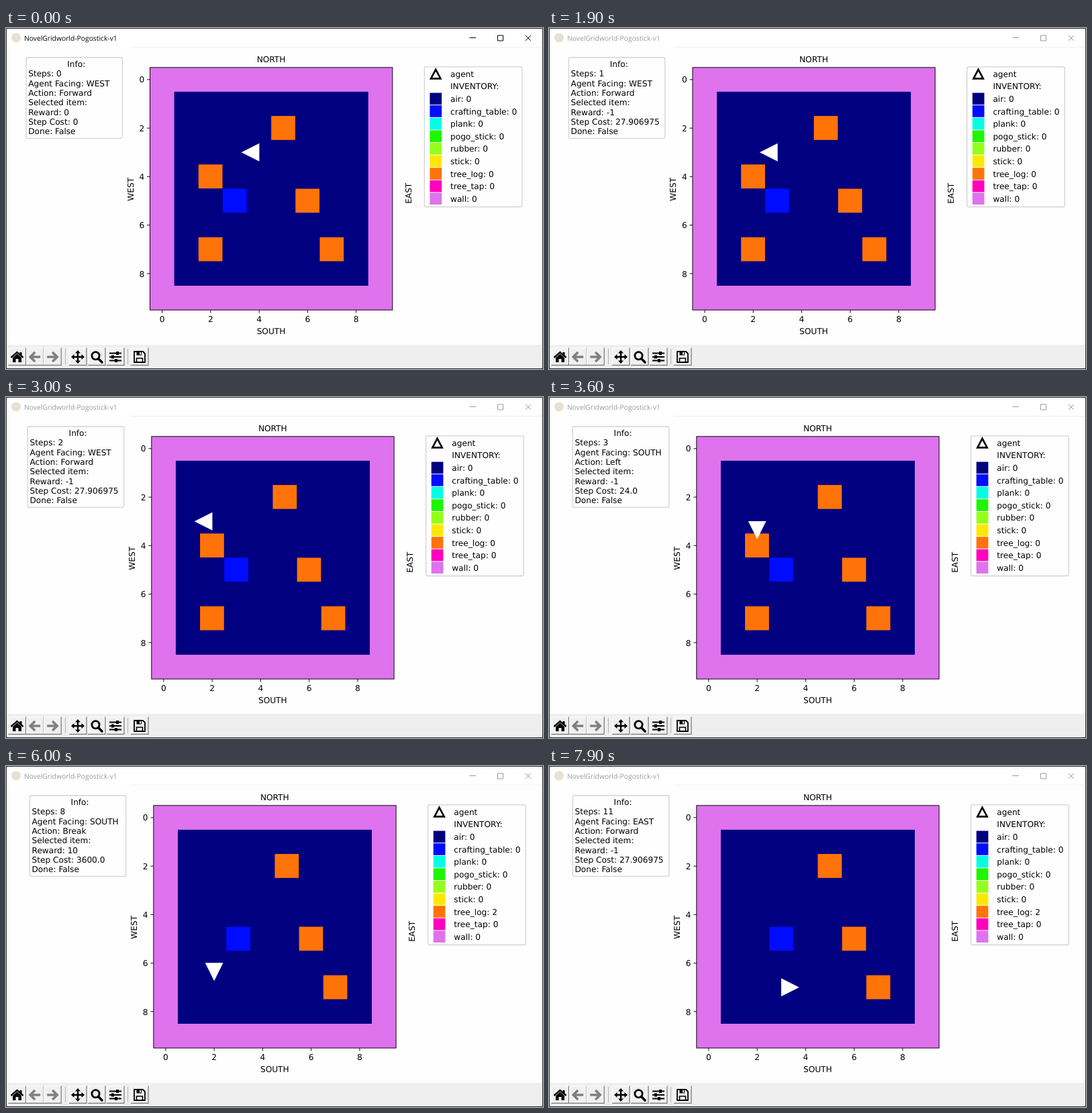
Recreate the animation shown at these times as an HTML page. Size 800 by 508 pixels, loop 8000 ms.

```html
<!DOCTYPE html>
<html lang="en">
<head>
<meta charset="utf-8">
<title>Gridworld</title>
<style>
html, body { margin: 0; width: 100%; height: 100%; overflow: hidden; background: #fff; }
svg { display: block; width: 100vw; height: 100vh; }
text { font: 12.15px "DejaVu Sans", sans-serif; text-rendering: geometricPrecision; white-space: pre; }
#title { font: 10.3px "Open Sans", sans-serif; }
</style>
</head>
<body>
<svg id="stage" viewBox="0 0 800 508"></svg>
<script>
const LOOP = 8000, CELL = 36.13, LEFT = 214.5, TOP = 58.8;
const COLORS = {
  air: '#000080', crafting_table: '#000cff', plank: '#00ffe4', pogo_stick: '#20f500',
  rubber: '#94ff1a', stick: '#ffe800', tree_log: '#ff7308', tree_tap: '#ff00be', wall: '#de73ed'
};
const FACING = {
  WEST: { dx: -1, dy: 0, turn: -90, left: 'SOUTH' },
  SOUTH: { dx: 0, dy: 1, turn: 180, left: 'EAST' },
  EAST: { dx: 1, dy: 0, turn: 90, left: 'NORTH' }
};
const COST = { Forward: '27.906975', Left: '24.0', Break: '3600.0' };
const ACTIONS = [
  [1900, 'Forward'], [2800, 'Forward'], [3300, 'Left'], [3700, 'Break'],
  [4200, 'Forward'], [4800, 'Forward'], [5400, 'Forward'], [5900, 'Break'],
  [6800, 'Forward'], [7400, 'Left'], [7800, 'Forward']
];
const SHIFT = [0, -0.6, 2.3, 5.3];
const LOGS = [[5, 2], [2, 4], [6, 5], [2, 7], [7, 7]];

const px = c => LEFT + (c + 0.5) * CELL;
const py = r => TOP + (r + 0.5) * CELL;
const rect = (x, y, w, h, fill, more = '') =>
  `<rect x="${x}" y="${y}" width="${w}" height="${h}" fill="${fill}" ${more}/>`;
const path = (d, stroke, width = 1, fill = 'none', more = '') =>
  `<path d="${d}" stroke="${stroke}" stroke-width="${width}" fill="${fill}" ${more}/>`;
const text = (x, y, s, anchor = 'start', more = '') =>
  `<text x="${x}" y="${y}" text-anchor="${anchor}" ${more}>${s}</text>`;
const upright = (x, y, s) => text(0, 0, s, 'middle', `transform="translate(${x} ${y}) rotate(-90)"`);
const block = (c, r, fill) => rect(px(c) - CELL / 2, py(r) - CELL / 2, CELL - 0.4, CELL - 0.4, fill);
const frame = (x, y, w, h) => rect(x, y, w, h, '#fefefe', 'rx="2.5" stroke="#d3d3d3" stroke-width="1.3"');

function stateAt(t) {
  const s = { steps: 0, x: 4, y: 3, face: 'WEST', action: 'Forward', reward: 0, cost: '0', logs: LOGS, count: 0 };
  for (const [start, action] of ACTIONS) {
    if (t < start) break;
    const f = FACING[s.face];
    s.steps++;
    s.action = action;
    s.cost = COST[action];
    s.reward = -1;
    if (action === 'Forward') {
      s.x += f.dx;
      s.y += f.dy;
    } else if (action === 'Left') {
      s.face = f.left;
    } else {
      s.logs = s.logs.filter(([x, y]) => x !== s.x + f.dx || y !== s.y + f.dy);
      s.count++;
      s.reward = 10;
    }
  }
  return s;
}

function windowBar(active) {
  const ink = active ? '#000' : '#999';
  return rect(0, 0, 800, 508, '#fefefe') + rect(0, 0, 800, 28, '#fff') + rect(186, 28, 614, 1, '#f0f0f0')
    + '<circle cx="15" cy="14.5" r="7" fill="#e9e0d2"/>'
    + text(27, 18.6, 'NovelGridworld-Pogostick-v1', 'start', `id="title" fill="${ink}"`)
    + path('M690.5 14.5h9.5M732.5 11h8v8h-8zM773.8 10.8l8.2 8.2M782 10.8l-8.2 8.2', ink);
}

function button(x, icon) {
  return rect(x, 476.5, 26, 26, '#f0f0f0')
    + path(`M${x + .5} 502V477h25`, '#fff')
    + path(`M${x} 502.3h26V476.5`, '#777', 1.2)
    + `<g transform="translate(${x + 13} 490)">${icon}</g>`;
}

function toolbar() {
  const arrow = 'M8 0H-6M0-7L-7 0L0 7';
  const home = path('M-9 1L0-7L9 1', '#000', 2.4) + path('M4-7h3v6h-3z', 'none', 0, '#000')
    + path('M-6.5 1.2L0-4.5L6.5 1.2V8H2V3H-2V8H-6.5z', 'none', 0, '#000');
  const back = path(arrow, '#808080', 3.6);
  const forward = path(arrow, '#808080', 3.6, 'none', 'transform="scale(-1 1)"');
  const move = path('M-7 0H7M0-7V7', '#000', 2.4)
    + path('M0-10l4 4.5h-8zM0 10l4-4.5h-8zM-10 0l4.5-4v8zM10 0l-4.5-4v8z', 'none', 0, '#000');
  const zoom = '<circle cx="-1.5" cy="-1.8" r="5.6" fill="none" stroke="#000" stroke-width="2.8"/>'
    + path('M2.8 2.8L8 8', '#000', 3.6, 'none', 'stroke-linecap="round"');
  const sliders = path('M-9-5.5H9M-9 0H9M-9 5.5H9', '#000', 1.8)
    + path('M3-8v5M-4-2.5v5M1 3v5', '#000', 4);
  const save = path('M-8-8H5L8-5V8H-8z', '#000', 1.8, '#f0f0f0', 'stroke-linejoin="round"')
    + path('M-4.5-8H3V-2.5H-4.5z', 'none', 0, '#000') + rect(0, -7, 2, 3.5, '#f0f0f0')
    + path('M-4.5 8V2H4.5V8', '#000', 1.6);
  return rect(0, 472, 800, 36, '#f0eff0')
    + button(3.5, home) + button(30.2, back) + button(56.2, forward)
    + button(94, move) + button(122, zoom) + button(150, sliders) + button(186, save)
    + path('M88.5 478v23M181.5 478v23', '#b4b4b4');
}

function info(s) {
  const lines = [`Steps: ${s.steps}`, `Agent Facing: ${s.face}`, `Action: ${s.action}`, 'Selected item:',
    `Reward: ${s.reward}`, `Step Cost: ${s.cost}`, 'Done: False'];
  return frame(30, 44, 143.4, 120.3) + text(104.8, 58, 'Info:', 'middle')
    + lines.map((line, i) => text(33.2, 72.3 + i * 14.3, line)).join('');
}

function legend(s) {
  const rows = Object.entries(COLORS).map(([name, color], i) => {
    const y = 105.4 + i * 18.6;
    return rect(631.4, y - 8.8, 17.7, 17.6, color)
      + text(662, y + 4.5, `${name}: ${name === 'tree_log' ? s.count : 0}`);
  });
  return frame(623.3, 57.8, 145.6, 208.7)
    + path('M640.2 61.8L647.4 75.4H633z', '#000', 2.6, '#fefefe')
    + text(662, 72.9, 'agent') + text(662, 91.4, 'INVENTORY:') + rows.join('');
}

function board(s) {
  const size = CELL * 10;
  let out = rect(LEFT, TOP, size, size, COLORS.wall)
    + rect(LEFT + CELL, TOP + CELL, CELL * 8, CELL * 8, COLORS.air)
    + s.logs.map(([c, r]) => block(c, r, COLORS.tree_log)).join('')
    + block(3, 5, COLORS.crafting_table)
    + path('M-13.4 .3H13.4L0-26.5z', 'none', 0, '#fff',
      `transform="translate(${px(s.x)} ${py(s.y)}) rotate(${FACING[s.face].turn})"`)
    + rect(LEFT, TOP, size, size, 'none', 'stroke="#000" stroke-width=".95"');
  for (let i = 0; i < 10; i += 2) {
    out += path(`M${px(i)} ${TOP + size}v4.4M${LEFT} ${py(i)}h-4.4`, '#000', 0.95)
      + text(px(i), 438.3, i, 'middle') + text(206.3, py(i) + 4.6, i, 'end');
  }
  return out + text(395, 51.4, 'NORTH', 'middle') + text(395, 455.8, 'SOUTH', 'middle')
    + upright(189.6, 240.3, 'WEST') + upright(603.8, 246.3, 'EAST');
}

const stage = document.getElementById('stage');
const bar = toolbar();
const border = rect(0.5, 0.5, 799, 507, 'none', 'stroke="#2a2a2a"');
let shown = -1;

function draw(t) {
  const s = stateAt(t);
  if (s.steps === shown) return;
  shown = s.steps;
  const shift = SHIFT[Math.min(s.steps, SHIFT.length - 1)];
  stage.innerHTML = windowBar(s.steps === 0)
    + `<g transform="translate(${shift})">${info(s)}${board(s)}${legend(s)}</g>` + bar + border;
}

const begin = performance.now();
function tick() {
  draw((performance.now() - begin) % LOOP);
  requestAnimationFrame(tick);
}
tick();
</script>
</body>
</html>
```
